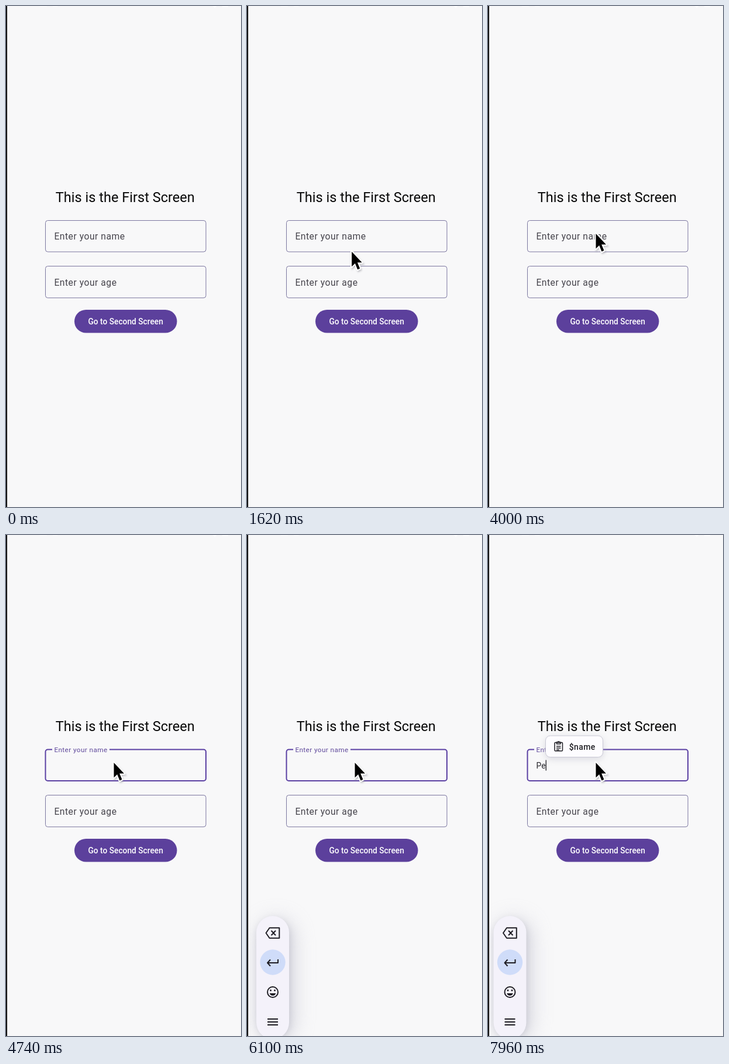
These frames come from a looping animation (402x856 px, 8 s). An HTML page:

```html
<!DOCTYPE html>
<html lang="en">
<head>
<meta charset="utf-8">
<title>First screen form</title>
<style>
  html, body { margin: 0; width: 100%; height: 100%; overflow: hidden; background: #f8f8f9; }
  svg { display: block; width: 402px; height: 856px; }
  text { font-family: Roboto, sans-serif; white-space: pre; }
  .line { fill: none; stroke-linejoin: round; }
  .icon { fill: none; stroke: #1f1e24; stroke-width: 2; stroke-linejoin: round; }
  .solid { fill: #1f1e24; stroke: none; }
  .thin { stroke-width: 1.5; }
  .body { font-size: 15.72px; letter-spacing: .49px; fill: #46444c; }
</style>
</head>
<body>
<svg viewBox="0 0 402 856">
  <defs>
    <filter id="wide" x="-150%" y="-50%" width="400%" height="200%"><feGaussianBlur stdDeviation="16"/></filter>
    <filter id="near" x="-50%" y="-50%" width="200%" height="200%"><feGaussianBlur stdDeviation="6"/></filter>
    <filter id="soft" x="-50%" y="-50%" width="200%" height="200%"><feGaussianBlur stdDeviation="1.8"/></filter>
  </defs>
  <rect width="402" height="856" fill="#f8f8f9"/>
  <path d="M353 0h7v1l-3 2zM370 0h10v2h-10zM58 0h12v1H58zM80 0h8v1h-8z" fill="#fff"/>

  <text x="84.8" y="335" font-size="23.57" fill="#080808">This is the First Screen</text>

  <path id="nameBox" class="line"/>
  <text id="label">Enter your name</text>
  <text id="typed" x="82.4" y="398.7" font-size="13.75" letter-spacing=".25" fill="#29282e"></text>
  <rect id="caret" y="384.5" width="1.4" height="18" fill="#29282e"/>

  <rect class="line" x="67.5" y="444.5" width="274.5" height="54.2" rx="4" stroke="#7c77a0"/>
  <text class="body" x="82.4" y="478">Enter your age</text>

  <rect x="117" y="519" width="175.5" height="39.6" rx="19.8" fill="#5c409c"/>
  <text x="204.7" y="544" text-anchor="middle" font-size="13.75" font-weight="500" fill="#fff">Go to Second Screen</text>

  <g id="bar">
    <g id="glow">
      <rect x="-27" y="-178" width="66" height="212" rx="33" fill="#c6c6d2" opacity=".6" filter="url(#wide)"/>
      <rect x="-27" y="-176" width="57" height="205" rx="28" fill="#a9a9b8" opacity=".4" filter="url(#near)"/>
    </g>
    <rect id="pill" x="-28" y="-181" width="56" height="210" rx="28" fill="#f4f2fa"/>
    <circle id="enter" cy="-102" r="21.7" fill="#cfdcf9"/>
    <g id="icons" class="icon">
      <path d="M-11.5-152l6-8.7H11.3v17.4H-5.5zM-2.5-156l7.5 8M5-156l-7.5 8"/>
      <path d="M9-107v6H-9M-4-106.5l-5 5.5 5 5.5"/>
      <circle cy="-51" r="9"/>
      <path class="solid" d="M-5.3-49H5.3A5.5 5.5 0 0 1-5.3-49z"/>
      <circle class="solid" cx="-3.5" cy="-54" r="1.5"/>
      <circle class="solid" cx="3.5" cy="-54" r="1.5"/>
      <path d="M-9-5H9M-9 0H9M-9 5H9"/>
    </g>
  </g>

  <g id="chip">
    <rect x="0" y="346" width="99" height="37" rx="9" fill="#b4b4c2" opacity=".45" filter="url(#near)"/>
    <rect x=".5" y="343" width="98" height="36.5" rx="8" fill="#fdfcff" stroke="#c9c8d4"/>
    <g class="icon">
      <rect class="thin" x="16" y="354.5" width="13.5" height="14.5" rx="1.5"/>
      <path class="thin" d="M19 361h7.5M19 364h7.5M19 367h5M19.5 355.5v-1.5h1.5a2 2 0 0 1 3.5 0h1.5v3h-6.5z"/>
    </g>
    <text x="40.7" y="366.7" font-size="14" font-weight="500" letter-spacing=".4" fill="#1f1e24">$name</text>
  </g>

  <g id="cursor">
    <path id="shade" transform="translate(1.5 2.5)" fill="#85858f" stroke="#85858f" stroke-width="3" opacity=".5" filter="url(#soft)"/>
    <path id="arrow" fill="#000" stroke="#fff" stroke-width="4.5" paint-order="stroke" stroke-linejoin="round"/>
  </g>

  <rect width="2" height="856" fill="#111"/>
</svg>
<script>
const LOOP = 8000;
const $ = id => document.getElementById(id);
const set = (id, attrs) => {
  for (const k in attrs) $(id).setAttribute(k, attrs[k]);
};
const mix = (a, b, p) => a + (b - a) * p;
const span = (t, a, b) => Math.min(1, Math.max(0, (t - a) / (b - a)));
const smooth = p => p * p * (3 - 2 * p);

const ARROW = 'M0 0V25.5L5.7 20 10 30.5 14 28.8 9.7 18.6H17.5z';
set('arrow', { d: ARROW });
set('shade', { d: ARROW });

// time, x, y of the pointer tip
const PATH = [
  [20, -22, 757], [680, 99.5, 576.5], [780, 99.5, 576.5], [820, 125, 526], [920, 125, 526],
  [1640, 179.5, 419], [1760, 179.5, 419], [2200, 184.5, 389], [LOOP, 184.5, 389]
];

function pointer(t) {
  const i = Math.max(1, PATH.findIndex(k => k[0] >= t));
  const [a, b] = [PATH[i - 1], PATH[i]];
  let p = span(t, a[0], b[0]);
  if (a[0] >= 920) p = 1 - (1 - p) ** 1.4;
  return [mix(a[1], b[1], p), mix(a[2], b[2], p)];
}

function drawField(t) {
  const p = smooth(span(t, 4500, 4660));
  const right = mix(79, 177, p);
  set('nameBox', {
    d: `M${right} 366.5H338a4 4 0 0 1 4 4V416a4 4 0 0 1-4 4H71.5a4 4 0 0 1-4-4V370.5a4 4 0 0 1 4-4H79`,
    stroke: p > 0 ? '#5b40a3' : '#7c77a0',
    'stroke-width': mix(1, 2, p)
  });
  set('label', {
    x: 82.4, y: mix(399, 370.5, p),
    'font-size': mix(15.72, 11.79, p),
    'letter-spacing': mix(.49, .39, p),
    fill: p > 0 ? '#604a9c' : '#46444c'
  });
}

// grows from the edge, swings a little too far and settles
function drawBar(t) {
  const p = span(t, 5380, 5700);
  const back = smooth(span(t, 6120, 6480));
  const x = mix(25, 44, p) - 6.5 * back;
  set('bar', {
    transform: `translate(${x} 832) scale(${mix(.754, 1, p)})`,
    visibility: p > 0 ? 'visible' : 'hidden'
  });
  set('glow', { opacity: p });
  set('pill', { opacity: Math.min(1, p * 1.5) });
  set('enter', { opacity: p });
  set('icons', { opacity: p });
}

function drawTyping(t) {
  const count = t < 7560 ? 0 : t < 7780 ? 1 : 2;
  const caretX = [82.4, 91.5, 98.6][count];
  const show = count ? 'visible' : 'hidden';
  $('typed').textContent = 'Pe'.slice(0, count);
  set('caret', { x: caretX, visibility: show });
  set('chip', {
    transform: `translate(${caretX - .6} 0)`,
    visibility: show,
    opacity: span(t, 7540, 7640)
  });
}

function draw(t) {
  const [x, y] = pointer(t);
  set('cursor', { transform: `translate(${x} ${y})` });
  drawField(t);
  drawBar(t);
  drawTyping(t);
}

const start = performance.now();
function tick() {
  draw((performance.now() - start) % LOOP);
  requestAnimationFrame(tick);
}
tick();
</script>
</body>
</html>
```
